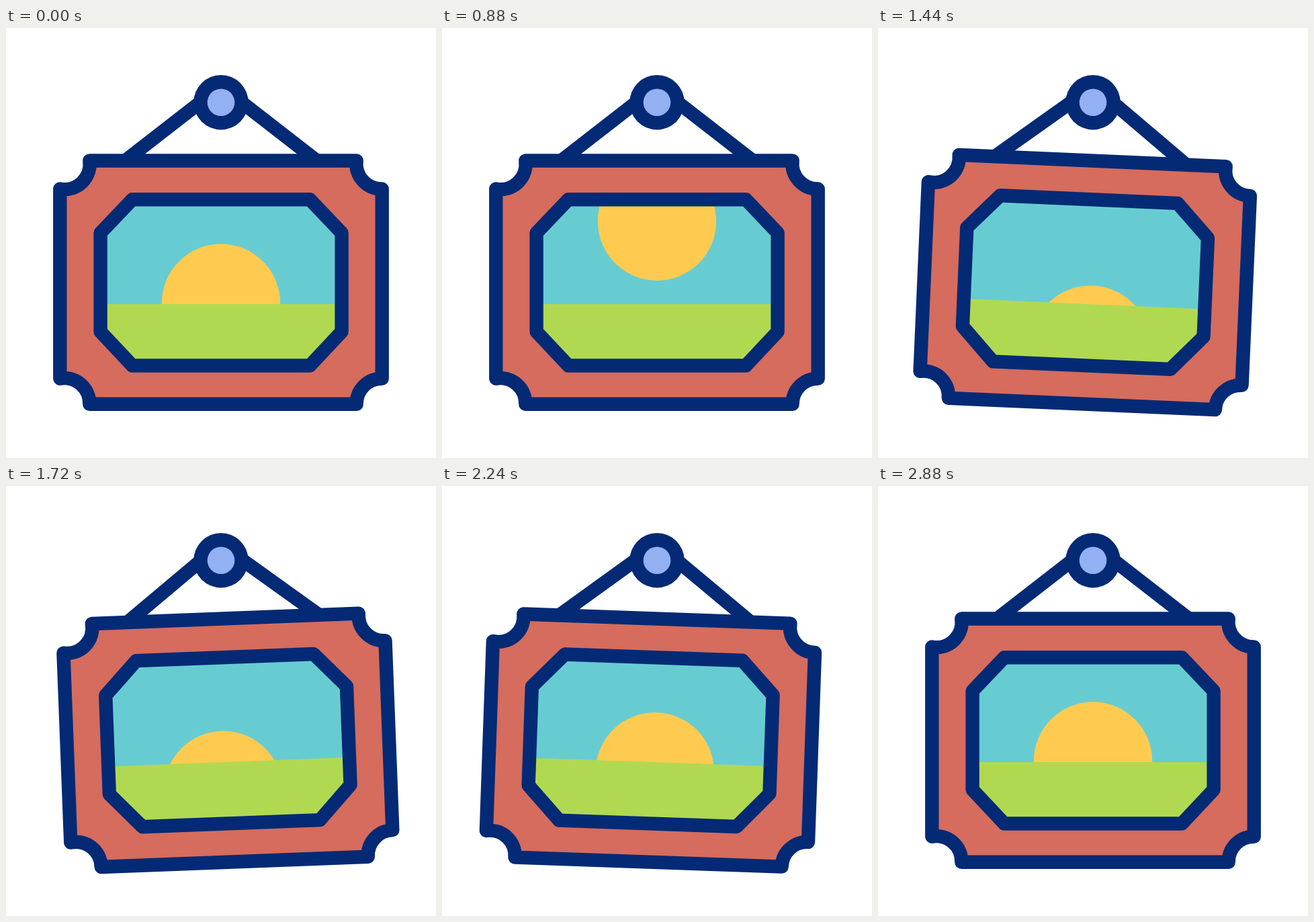
Write an HTML page with a canvas that moves like this. It is 640 px wide and 640 px high and loops after 3000 ms.

```html
<!DOCTYPE html>
<html lang="en">
<head>
<meta charset="utf-8">
<title>Swinging picture</title>
<style>
  html, body { margin: 0; width: 100%; height: 100%; overflow: hidden; background: #fff; }
  canvas { display: block; }
</style>
</head>
<body>
<canvas id="stage" width="640" height="640"></canvas>
<script>
const ctx = document.getElementById('stage').getContext('2d');
const LOOP = 3000, STEP = 40, END = 2880;
const PIN = { x: 320, y: 110.7 };
const SUN = { x: 320, y: 409.5, r: 88.2 };
const NAVY = '#042a75';

const outline = new Path2D(
  'M80.3 239.5A37.5 37.5 0 0 0 124.3 197.5H521.7A37.5 37.5 0 0 0 559.7 239.5' +
  'V521.7A37.5 37.5 0 0 0 521.7 559.8H124.3A37.5 37.5 0 0 0 80.3 521.7Z');
const opening = new Path2D(
  'M188 255.2H452.3L499.6 305V452L452.3 502.5H188L140.6 452V305Z');
const ropes = new Path2D('M290 110L178 197M350 110L462 197');

// Swing: [time in ms, angle in degrees]
const swing = [[332, 0], [588, -8.15], [1172, 8.15], [1680, -2.25], [2290, 2.1], [2825, 0]];

function angleAt(t) {
  const i = swing.findIndex(key => t < key[0]);
  if (i < 1) return 0;
  const [t0, a0] = swing[i - 1], [t1, a1] = swing[i];
  const eased = (1 - Math.cos(Math.PI * (t - t0) / (t1 - t0))) / 2;
  return (a0 + (a1 - a0) * eased) * Math.PI / 180;
}

// cubic-bezier(.42, 0, 1, 1), solved by bisection
function easeIn(u) {
  let lo = 0, hi = 1;
  for (let i = 0; i < 24; i++) {
    const s = (lo + hi) / 2, r = 1 - s;
    if (1.26 * r * r * s + 3 * r * s * s + s ** 3 < u) lo = s; else hi = s;
  }
  return lo * lo * (3 - 2 * lo);
}

function disc(x, y, r, fill) {
  ctx.beginPath();
  ctx.arc(x, y, r, 0, 2 * Math.PI);
  ctx.fillStyle = fill;
  ctx.fill();
}

function turn(angle) {
  ctx.translate(PIN.x, PIN.y);
  ctx.rotate(angle);
  ctx.translate(-PIN.x, -PIN.y);
}

// The sun tilts about its top edge and keeps its height on the stage
function sun(offset, angle) {
  disc(SUN.x - SUN.r * Math.sin(angle),
       SUN.y + offset - SUN.r * (1 - Math.cos(angle)), SUN.r, '#fecb50');
}

function draw(t) {
  const angle = angleAt(t);
  ctx.fillStyle = '#fff';
  ctx.fillRect(0, 0, 640, 640);
  ctx.lineWidth = 20.4;
  ctx.lineCap = ctx.lineJoin = 'round';
  ctx.strokeStyle = NAVY;

  ctx.save();
  turn(angle);
  ctx.stroke(ropes);
  ctx.fillStyle = '#d56c5e';
  ctx.fill(outline);
  ctx.stroke(outline);

  ctx.save();
  ctx.clip(opening);
  ctx.fillStyle = '#67ccd1';
  ctx.fillRect(130, 245, 380, 270);
  ctx.save();
  turn(-angle);
  // One sun leaves at the top while the next rises from the horizon
  if (t < 1300) sun(-232 * easeIn(t / 1300), angle);
  if (t > 1100) sun(88 * easeIn((END - t) / 1780), angle);
  ctx.restore();
  ctx.fillStyle = '#b0d951';
  ctx.fillRect(130, 411, 380, 104);
  ctx.restore();

  ctx.stroke(opening);
  ctx.restore();

  disc(PIN.x, PIN.y, 40.7, NAVY);
  disc(PIN.x, PIN.y, 20.3, '#93b0f3');
}

const start = performance.now();
function tick() {
  const t = (performance.now() - start) % LOOP;
  draw(Math.min(END, Math.floor(t / STEP) * STEP));
  requestAnimationFrame(tick);
}
tick();
</script>
</body>
</html>
```
